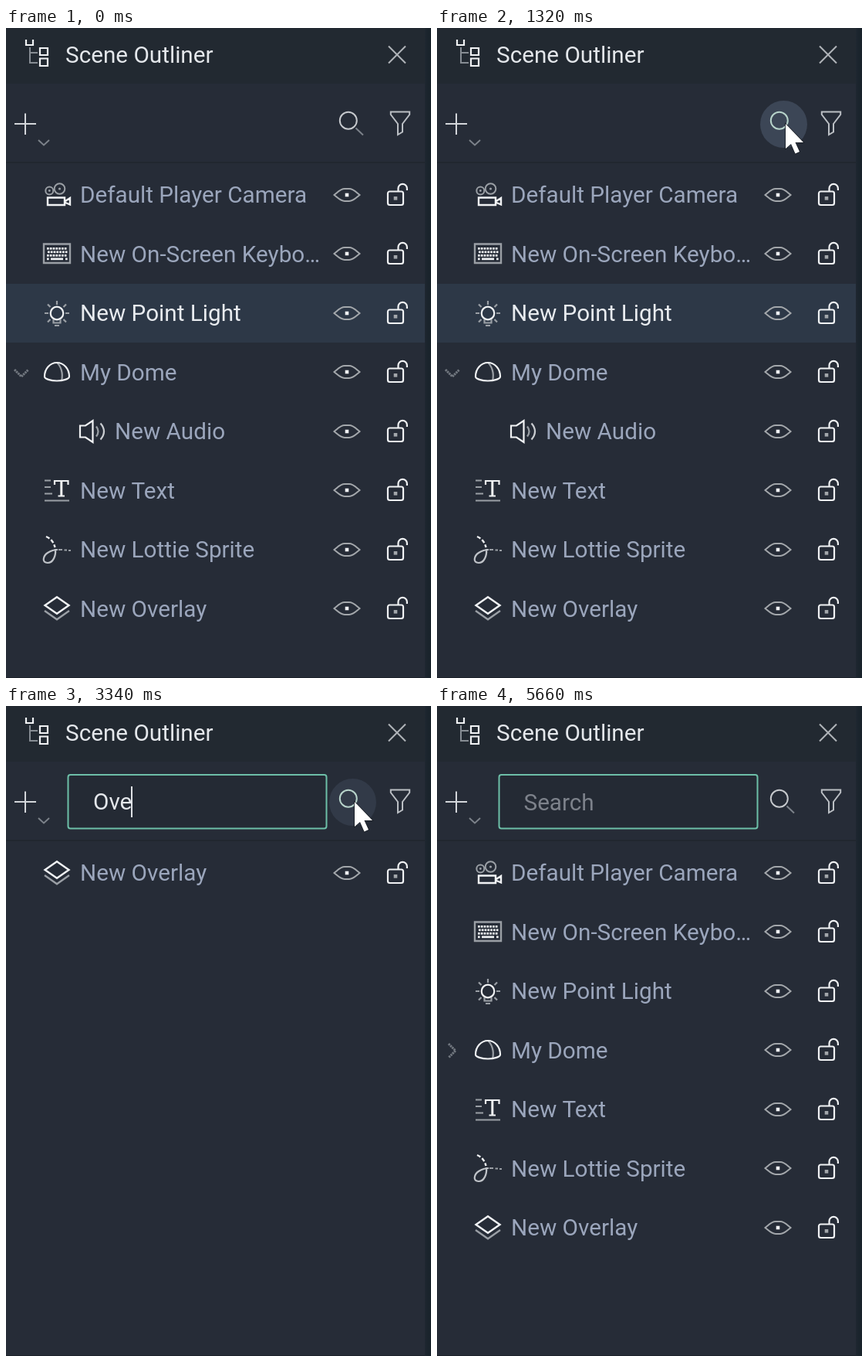
Animation of 551 by 841 pixels, one loop 5.73 s. Source, as an HTML page with a canvas:

```html
<!DOCTYPE html>
<html lang="en">
<head>
<meta charset="utf-8">
<title>Scene Outliner</title>
<style>
html, body { margin: 0; width: 100%; height: 100%; overflow: hidden; background: #262c37; }
canvas { display: block; }
</style>
</head>
<body>
<canvas id="stage" width="551" height="841"></canvas>
<script>
const ctx = document.getElementById('stage').getContext('2d');
const LOOP = 5730, ROW = 76.5, FIRST = 216;
const WHITE = '#f0f2f4', GREY = '#9a9fa5', DIM = '#7c828a', LABEL = '#9ba6bc';
const FONT = '29.7px Roboto, "Open Sans", sans-serif';

function line(d, color = WHITE, width = 2.2, dash = []) {
  ctx.strokeStyle = color;
  ctx.lineWidth = width;
  ctx.setLineDash(dash);
  ctx.stroke(new Path2D(d));
  ctx.setLineDash([]);
}

function disc(x, y, r, color) {
  ctx.fillStyle = color;
  ctx.beginPath();
  ctx.arc(x, y, r, 0, Math.PI * 2);
  ctx.fill();
}

function ring(x, y, r, color, width = 2) {
  ctx.strokeStyle = color;
  ctx.lineWidth = width;
  ctx.beginPath();
  ctx.arc(x, y, r, 0, Math.PI * 2);
  ctx.stroke();
}

function box(x, y, w, h, color) {
  ctx.fillStyle = color;
  ctx.fillRect(x, y, w, h);
}

function text(s, x, y, color) {
  ctx.font = FONT;
  ctx.fillStyle = color;
  ctx.fillText(s, x, y);
}

// Row icons are drawn around the vertical middle of their row.
const icons = {
  camera() {
    ring(56.3, -5.5, 5, GREY);
    ring(69.5, -8, 6.8, GREY);
    disc(56.3, -5.5, 1.4, GREY);
    disc(69.5, -8, 1.6, GREY);
    line('M54 3.5H76V13H54ZM76 8.5L83 4V12.5L76 9.5', WHITE, 2.4);
  },
  keyboard() {
    line('M49 -12.5H83V12H49Z', GREY, 2.4);
    for (let r = 0; r < 3; r++)
      for (let c = 0; c < 7; c++) box(53 + c * 3.8 + (r % 2), -8 + r * 4.5, 2.7, 2.7, WHITE);
    box(53, 5.5, 2.7, 2.7, WHITE);
    box(58, 5.5, 16, 2.7, WHITE);
    box(77, 5.5, 2.7, 2.7, WHITE);
  },
  light() {
    ring(66, 0, 8.3, WHITE, 2.2);
    line('M66 -16V-11M50 0H55M77 0H82M54 -11.5L57.5 -8M78 -11.5L74.5 -8M54 11.5L57.5 8M78 11.5L74.5 8', GREY);
    line('M61.5 8V12.5H70.5V8M63 16H69', GREY);
  },
  dome() {
    line('M66 -12C71 -8 74.5 2 72 11', GREY);
    line('M50 6C50 -4 57 -12 66 -12C75 -12 82 -4 82 6C82 9 74 11.5 66 11.5C58 11.5 50 9 50 6Z');
  },
  audio() {
    line('M96 -7.5H103L112.5 -14V14L103 7.5H96Z');
    line('M117 -6.5Q122 0 117 6.5', GREY);
    line('M122.5 -10.5Q131.5 0 122.5 10.5', '#c9ccd0');
  },
  text() {
    line('M50 -12.5H58M50 -4H58M50 4.5H60M50 13.5H82', GREY, 2);
    line('M63 -7V-12H80.5V-7M67.5 7.5H76');
    line('M71.8 -12V7.5', WHITE, 3);
  },
  sprite() {
    line('M52 -17C59 -14 62 -9 63.5 -3', WHITE, 2.4, [5, 2.5]);
    line('M64 -1C65 8 61 17 54 17C46 17 48 8 54 4C58 1.5 62 0 67 0', '#bfc3c8');
    line('M68 0H73M75.5 .5H79M81 1H84', GREY);
  },
  overlay() {
    line('M50 3L66 14.3L82 3', GREY, 2.4);
    line('M66 -14.7L81.5 -4L66 6.7L50.5 -4Z', WHITE, 2.4);
  }
};

const items = [
  ['camera', 'Default Player Camera'],
  ['keyboard', 'New On-Screen Keybo…', 'New On-Screen Keyboard'],
  ['light', 'New Point Light'],
  ['dome', 'My Dome'],
  ['audio', 'New Audio'],
  ['text', 'New Text'],
  ['sprite', 'New Lottie Sprite'],
  ['overlay', 'New Overlay']
];

function drawEye() {
  line('M425.5 0C431 -4.5 434 -8 439 -8H445C450 -8 453 -4.5 458.5 0C453 4.5 450 8 445 8H439C434 8 431 4.5 425.5 0Z', '#a3a7ab', 2);
  box(439.7, -2.3, 4.6, 4.6, WHITE);
}

function drawLock() {
  ctx.strokeStyle = WHITE;
  ctx.lineWidth = 2.2;
  ctx.beginPath();
  ctx.roundRect(495, -4.5, 20, 17.5, 2.5);
  ctx.stroke();
  line('M508.5 -4.5V-8.5A5.7 5.7 0 0 1 519.9 -8.5V-6');
  box(502.7, 2, 4.6, 4.6, '#a3a7ab');
}

function drawRow([icon, label], i, s) {
  const mid = FIRST + i * ROW, top = Math.floor(mid - 38), bottom = Math.floor(mid + 38.5);
  const chosen = icon === 'light' && !s.folded;
  if (chosen) box(0, top, 543, bottom - top, '#2d3847');
  else if (s.hoverRow && i === 0) box(0, top, 543, bottom - top, '#2a323e');

  ctx.save();
  ctx.translate(0, Math.floor(mid));
  icons[icon]();
  if (icon === 'dome')
    line(s.folded ? 'M15 -8L24 1L15 10' : 'M11 -3L20 6L29 -3', '#737981', 3, [2.4, .8]);
  drawEye();
  drawLock();
  ctx.restore();

  text(label, icon === 'audio' ? 141 : 96, Math.round(mid + 10), chosen ? '#e8ebef' : LABEL);
}

function drawFrame() {
  box(0, 0, 551, 841, '#262c37');
  box(0, 0, 543, 72, '#222931');
  box(0, 173, 543, 2, '#21272f');
  box(0, 840, 543, 1, '#1c222a');
  const edge = ctx.createLinearGradient(541, 0, 551, 0);
  edge.addColorStop(0, '#232a34');
  edge.addColorStop(.4, '#1c252e');
  edge.addColorStop(1, '#18222a');
  box(543, 0, 8, 841, edge);

  line('M31 25V45H41M31 32H41', '#868c93', 2);
  line('M26 15V22H35V15M44 26H54V35H44ZM44 39.5H54V49H44Z');
  text('Scene Outliner', 77, 45, '#e4e7eb');
  line('M496 23.5L518 45.5M518 23.5L496 45.5', '#b0b4b9', 2);
  line('M11 124H39M25 110.5V138', '#d3d6da', 2);
  line('M42 145L49 151.5L56 145', DIM, 2);
  line('M498.8 108.5H523.2V112L514 124V134.5L508 138V124L498.8 112Z', '#bbbfc4', 2);
}

function drawSearch(s) {
  if (s.field) {
    ctx.fillStyle = '#242a34';
    ctx.strokeStyle = '#6dbfa8';
    ctx.lineWidth = 2;
    ctx.beginPath();
    ctx.roundRect(80.5, 89, 335, 69.5, 3);
    ctx.fill();
    ctx.stroke();
    if (s.typed) text(s.typed, 113, 134, '#e4e7eb');
    else text('Search', 112.5, 135, '#7d828b');
    if (s.caret) {
      ctx.font = FONT;
      box(Math.round(113 + ctx.measureText(s.typed).width) - 1, 104, 2, 40, '#dfe2e6');
    }
  }
  if (s.glow) disc(449.5, 124.5, 30.5, s.press ? '#3c4656' : '#323a48');
  line('M453.5 129.5L463 138.5', s.glow ? '#93a8a5' : DIM, 2);
  ring(443.8, 119.8, 11, s.glow ? '#b7d3ca' : '#c6c9cd');
}

function drawPointer([x, y]) {
  ctx.save();
  ctx.translate(x, y);
  const arrow = new Path2D('M0 0V32L7 26L12.5 38.5L18 36L12.5 24H23Z');
  ctx.strokeStyle = '#171c23';
  ctx.lineWidth = 1.5;
  ctx.stroke(arrow);
  ctx.fillStyle = '#fff';
  ctx.fill(arrow);
  ctx.restore();
}

// Each step changes only what it names; the rest carries over.
const rest = [452, 124];
const steps = [
  [0, { typed: '', field: false, folded: false, glow: false, caret: false, pointer: null }],
  [220, { pointer: [532, 212], hoverRow: true }],
  [440, { pointer: [482, 178] }],
  [660, { pointer: [453, 146], hoverRow: false }],
  [870, { pointer: [452, 130], glow: true }],
  [1080, { pointer: rest }],
  [1320, { press: true }],
  [1510, { field: true, caret: true }],
  [1700, { press: false }],
  [1900, { caret: false }],
  [2090, { caret: true }],
  [2290, { caret: false }],
  [2490, { typed: 'O', caret: true }],
  [2920, { typed: 'Ov' }],
  [3340, { typed: 'Ove' }],
  [3610, { typed: 'Ov', folded: true }],
  [3830, { typed: 'O' }],
  [4050, { typed: '' }],
  [4270, { caret: false }],
  [4490, { caret: true }],
  [4670, { caret: false, pointer: null }],
  [4860, { caret: true }],
  [5260, { glow: false, caret: false }],
  [5460, { caret: true }],
  [5660, { caret: false }]
];

function stateAt(t) {
  const s = {};
  for (const [at, change] of steps) if (at <= t) Object.assign(s, change);
  return s;
}

function listed([icon, label, full], s) {
  if (icon === 'audio' && s.folded) return false;
  return (full || label).toLowerCase().includes(s.typed.toLowerCase());
}

function render(t) {
  const s = stateAt(t);
  drawFrame();
  items.filter(item => listed(item, s)).forEach((item, i) => drawRow(item, i, s));
  drawSearch(s);
  if (s.pointer) drawPointer(s.pointer);
}

const start = performance.now();
function tick() {
  render((performance.now() - start) % LOOP);
  requestAnimationFrame(tick);
}
tick();
</script>
</body>
</html>
```
